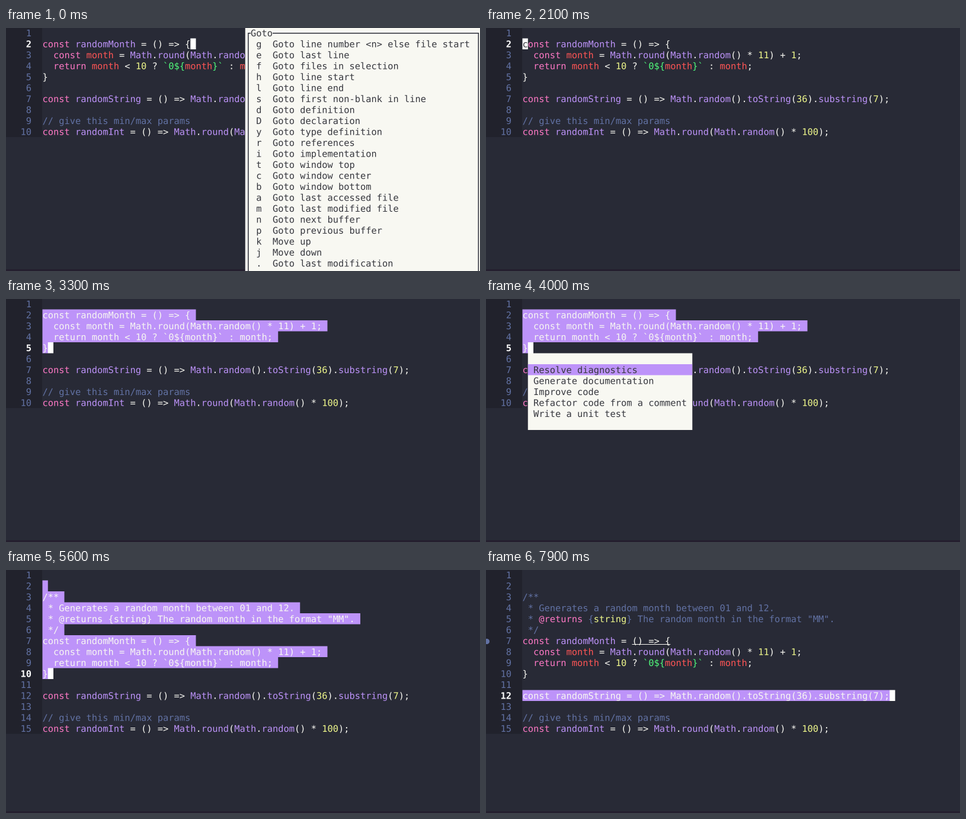
Write an HTML page with a canvas that moves like this. It is 800 px wide and 410 px high and loops after 8000 ms.

```html
<!DOCTYPE html>
<html lang="en">
<head>
<meta charset="utf-8">
<title>Editor session</title>
<style>
html, body { margin: 0; width: 800px; height: 410px; overflow: hidden; background: #282a36; }
canvas { display: block; width: 800px; height: 410px; }
</style>
</head>
<body>
<canvas id="stage" width="1600" height="820"></canvas>
<script>
const ctx = document.getElementById('stage').getContext('2d');
const LOOP = 8000, CELL = 9.25, ROW = 18.5, LEFT = 61.5, TOP = -1, BASELINE = 15, SIZE = 15.365;
const C = {
  bg: '#282a36', gutter: '#21222c', fg: '#f8f8f2', white: '#ffffff', ink: '#36373e', muted: '#6272a4',
  pink: '#ff79c6', purple: '#bd93f9', red: '#ff5555', yellow: '#f1fa8c', green: '#50fa7b'
};

const before = `
const randomMonth = () => {
  const month = Math.round(Math.random() * 11) + 1;
  return month < 10 ? \`0\${month}\` : month;
}

const randomString = () => Math.random().toString(36).substring(7);

// give this min/max params
const randomInt = () => Math.round(Math.random() * 100);`.split('\n');
const docs = `
/**
 * Generates a random month between 01 and 12.
 * @returns {string} The random month in the format "MM".
 */`.split('\n');
const after = [before[0], ...docs, ...before.slice(1)];

const menus = {
  Goto: `g  Goto line number <n> else file start
e  Goto last line
f  Goto files in selection
h  Goto line start
l  Goto line end
s  Goto first non-blank in line
d  Goto definition
D  Goto declaration
y  Goto type definition
r  Goto references
i  Goto implementation
t  Goto window top
c  Goto window center
b  Goto window bottom
a  Goto last accessed file
m  Goto last modified file
n  Goto next buffer
p  Goto previous buffer
k  Move up
j  Move down
.  Goto last modification`.split('\n'),
  Space: `f  Open file picker
F  Open file picker at current working directory
b  Open buffer picker
j  Open jumplist picker
s  Open symbol picker
S  Open workspace symbol picker
d  Open diagnostic picker
D  Open workspace diagnostic picker
a  Perform code action
'  Open last picker
g  Debug (experimental)
w  Window
y  Join and yank selections to clipboard
Y  Yank main selection to clipboard
p  Paste clipboard after selections
P  Paste clipboard before selections
R  Replace selections by clipboard content
/  Global search in workspace folder
k  Show docs for item under cursor
r  Rename symbol
h  Select symbol references`.split('\n')
};
const actions = ['Resolve diagnostics', 'Generate documentation', 'Improve code',
  'Refactor code from a comment', 'Write a unit test'];

// Each step changes part of the editor state; from = first selected row.
const steps = [
  [0, { lines: before, row: 1, col: 27, from: null, info: 'Goto', pick: null, busy: false, hint: false }],
  [400, { info: null, col: 0 }],
  [2300, { from: 1, col: 27 }],
  [2450, { row: 2, col: 51 }],
  [2600, { row: 3, col: 42 }],
  [2750, { row: 4, col: 1 }],
  [3450, { info: 'Space' }],
  [3750, { info: null }],
  [3850, { pick: 0 }],
  [4050, { pick: 1 }],
  [4300, { pick: null, busy: true }],
  [5200, { busy: false, lines: after, row: 9 }],
  [5900, { from: null, hint: true }],
  [6750, { row: 10, col: 0 }],
  [6950, { row: 11, col: 1 }],
  [7600, { from: 11, col: 67 }]
];

const x = col => LEFT + col * CELL;
const y = row => TOP + row * ROW;

function cells(row, col, width, color, height = 1) {
  ctx.fillStyle = color;
  ctx.fillRect(x(col), y(row), width * CELL, height * ROW);
}

function text(str, row, col, color, weight = '') {
  ctx.font = `${weight} ${SIZE}px "DejaVu Sans Mono", monospace`;
  ctx.fillStyle = color;
  [...str].forEach((ch, i) => ch !== ' ' && ctx.fillText(ch, x(col + i), y(row) + BASELINE));
}

function underline(row, col, width, color = C.fg) {
  ctx.fillStyle = color;
  ctx.fillRect(x(col), y(row) + BASELINE, width * CELL, 1);
}

function dot(row, color) {
  ctx.fillStyle = color;
  ctx.beginPath();
  ctx.arc(1.4, y(row) + 10.5, 4.6, 0, 7);
  ctx.fill();
}

function tokenColor(word) {
  if (/^(const|return|@returns)$/.test(word)) return C.pink;
  if (word === 'month') return C.red;
  if (/^\d|^string$/.test(word)) return C.yellow;
  return word.includes('`') ? C.green : C.purple;
}

function code(line, row) {
  const comment = /^(\/|\s\*)/.test(line);
  const pattern = comment ? /@returns|(?<=\{)string/g : /`0\$\{|\}`|\w+/g;
  let end = 0;
  const plain = to => text(line.slice(end, to), row, end, comment ? C.muted : C.fg);
  for (const match of line.matchAll(pattern)) {
    plain(match.index);
    text(match[0], row, match.index, tokenColor(match[0]));
    end = match.index + match[0].length;
  }
  plain(line.length);
}

function infoBox(title) {
  const items = menus[title];
  const width = Math.max(...items.map(s => s.length)) + 4;
  const col = 80 - width;
  cells(0, col, width, C.fg, 23);
  ctx.strokeStyle = C.bg;
  ctx.lineWidth = 1.5;
  ctx.strokeRect(x(col + 0.5) + 0.5, y(0.5) + 0.5, (width - 1) * CELL, 420);
  cells(0, col + 1, title.length, C.fg);
  text(title, 0, col + 1, C.ink);
  items.forEach((item, i) => text(item, i + 1, col + 2, C.ink));
}

function actionMenu(picked) {
  cells(5, 1, 30, C.fg, 7);
  actions.forEach((label, i) => {
    if (i === picked) cells(6 + i, 1, 30, C.purple);
    text(label, 6 + i, 2, C.ink);
  });
}

function draw(s) {
  ctx.fillStyle = C.bg;
  ctx.fillRect(0, 0, 800, 410);
  ctx.fillStyle = C.gutter;
  ctx.fillRect(0, 0, 61, y(s.lines.length));
  ctx.fillStyle = '#241f2e';
  ctx.fillRect(0, 407, 800, 3);

  s.lines.forEach((line, row) => {
    const number = String(row + 1), active = row === s.row;
    text(number, row, -2 - number.length, active ? C.white : C.muted, active ? 'bold' : '');
    const selected = s.from !== null && row >= s.from && row <= s.row;
    if (selected) {
      cells(row, 0, line.length + 1, C.purple);
      text(line, row, 0, C.fg);
      if (s.busy) underline(row, 0, line.length + 1);
    } else code(line, row);
  });

  cells(s.row, s.col, 1, C.white);
  text(s.lines[s.row][s.col] || '', s.row, s.col, C.ink);

  if (s.busy) {
    dot(1, C.purple);
    underline(s.row, s.col, 1, C.bg);
    text('Executing generateDocs...', 1, 55, C.purple);
  }
  if (s.hint) {
    dot(6, C.muted);
    underline(6, 20, 7);
  }
  if (s.info) infoBox(s.info);
  if (s.pick !== null) actionMenu(s.pick);
}

function frame() {
  const time = performance.now() % LOOP;
  draw(Object.assign({}, ...steps.filter(([at]) => at <= time).map(([, change]) => change)));
  requestAnimationFrame(frame);
}

// Drawn at double size so that rows can sit on half pixels.
ctx.scale(2, 2);
ctx.textRendering = 'geometricPrecision';
frame();
</script>
</body>
</html>
```
